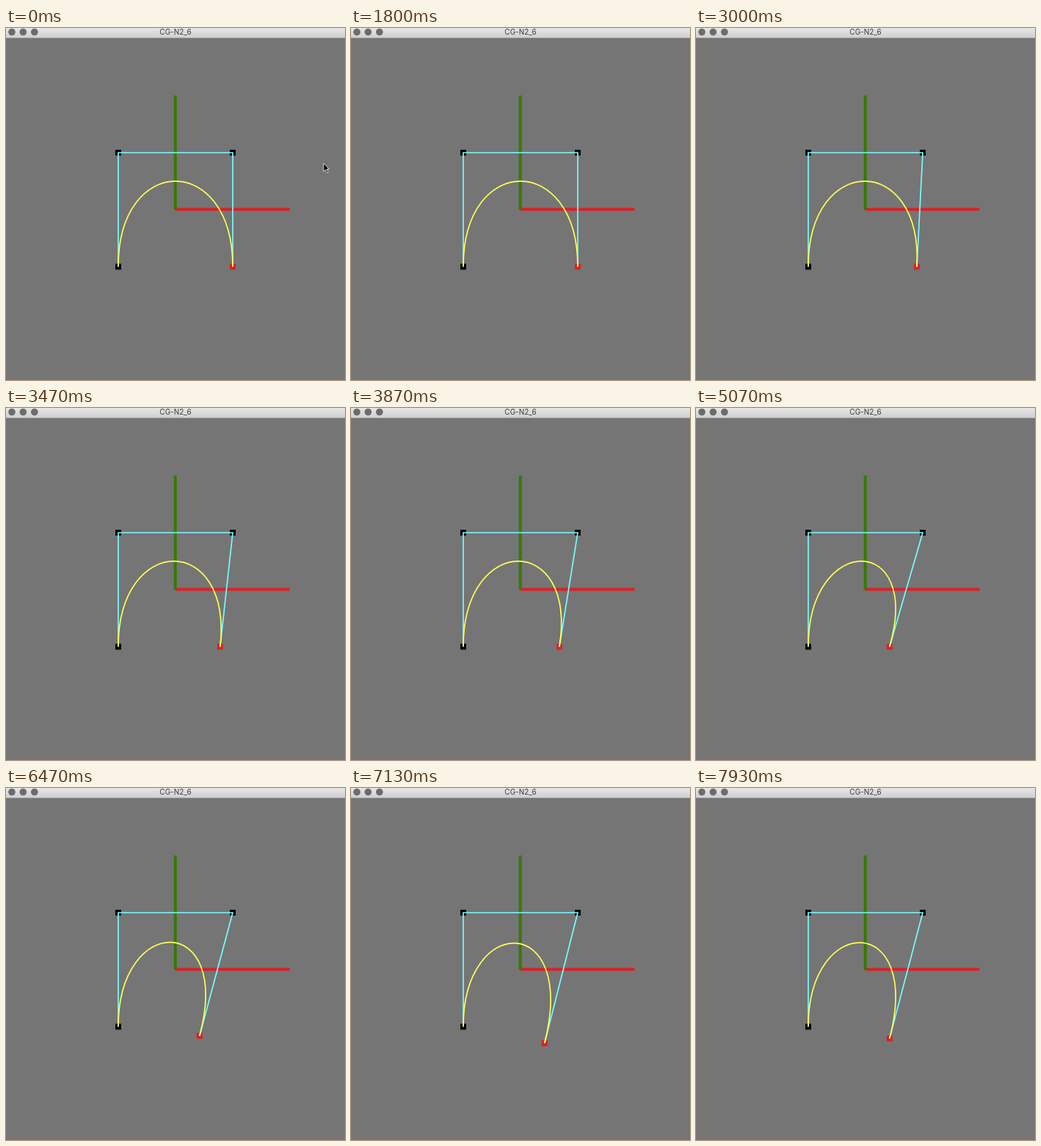
Recreate the animation shown at these times as an HTML page. Size 462 by 480 pixels, loop 8000 ms.

```html
<!DOCTYPE html>
<html lang="en">
<head>
<meta charset="utf-8">
<title>Bezier editor</title>
<style>
  html, body { margin: 0; width: 100%; height: 100%; overflow: hidden; background: #757575; }
  svg { display: block; width: 462px; height: 480px; }
  .title { font: 10px Inter, "Liberation Sans", sans-serif; fill: #3c3c3c; text-anchor: middle; }
  .line { fill: none; stroke-width: 1.7; }
</style>
</head>
<body>
<svg viewBox="0 0 462 480">
  <defs>
    <linearGradient id="bar" x2="0" y2="1">
      <stop offset="0" stop-color="#e6e6e6"/>
      <stop offset="1" stop-color="#d0d0d0"/>
    </linearGradient>
  </defs>
  <rect width="462" height="480" fill="#757575"/>
  <rect width="462" height="13" fill="url(#bar)"/>
  <rect y="13" width="462" height="1" fill="#a6a6a6"/>
  <g fill="#6c6c6c">
    <circle cx="8" cy="5.5" r="4.8"/>
    <circle cx="23.3" cy="5.5" r="4.8"/>
    <circle cx="38.8" cy="5.5" r="4.8"/>
  </g>
  <text class="title" x="231" y="9.3">CG-N2_6</text>

  <rect x="231" y="245.3" width="155.5" height="4" fill="#da2128"/>
  <rect x="228.7" y="92" width="4" height="156" fill="#367a00"/>

  <g fill="#000">
    <rect x="149" y="321.5" width="8" height="8"/>
    <rect x="149" y="166" width="8" height="8"/>
    <rect x="305" y="166" width="8" height="8"/>
  </g>
  <rect id="handle" width="8" height="8" fill="#da2128"/>
  <path id="hull" class="line" stroke="#78fbfd"/>
  <path id="curve" class="line" stroke="#fffe54" stroke-width="1.5"/>
  <path id="cursor" fill="#000" stroke="#e8e8e8" stroke-width=".9"
        d="M432.8 184.3V195.6L435.3 193.2L437.2 197.6L439 196.8L437.1 192.6H440.3Z"/>
</svg>
<script>
  const LOOP = 8000, TICK = 1000 / 15;

  // [tick, position] of the dragged end point
  const keysX = [[29, 309], [30, 308.2], [35, 308.2], [36, 307.4], [39, 307.4],
                 [45, 301], [58, 284], [75, 263.8]];
  const keysY = [[88, 325.5], [97, 338], [101, 344.2], [104, 348], [114, 348], [119, 340]];

  const [handle, hull, curve, cursor] =
    ["handle", "hull", "curve", "cursor"].map(id => document.getElementById(id));

  function valueAt(keys, tick) {
    const i = keys.findIndex(([k]) => k >= tick);
    if (i === 0) return keys[0][1];
    if (i < 0) return keys[keys.length - 1][1];
    const [k0, v0] = keys[i - 1], [k1, v1] = keys[i];
    return v0 + (v1 - v0) * (tick - k0) / (k1 - k0);
  }

  function draw(time) {
    const tick = Math.floor(time % LOOP / TICK);
    const x = valueAt(keysX, tick), y = valueAt(keysY, tick);
    handle.setAttribute("x", x - 4);
    handle.setAttribute("y", y - 4);
    hull.setAttribute("d", `M153 325.5V170H309L${x} ${y}`);
    curve.setAttribute("d", `M153 325.5C153 170 309 170 ${x} ${y}`);
    cursor.style.visibility = tick ? "hidden" : "visible";
  }

  const start = performance.now();
  function loop() {
    draw(performance.now() - start);
    requestAnimationFrame(loop);
  }
  loop();
</script>
</body>
</html>
```
